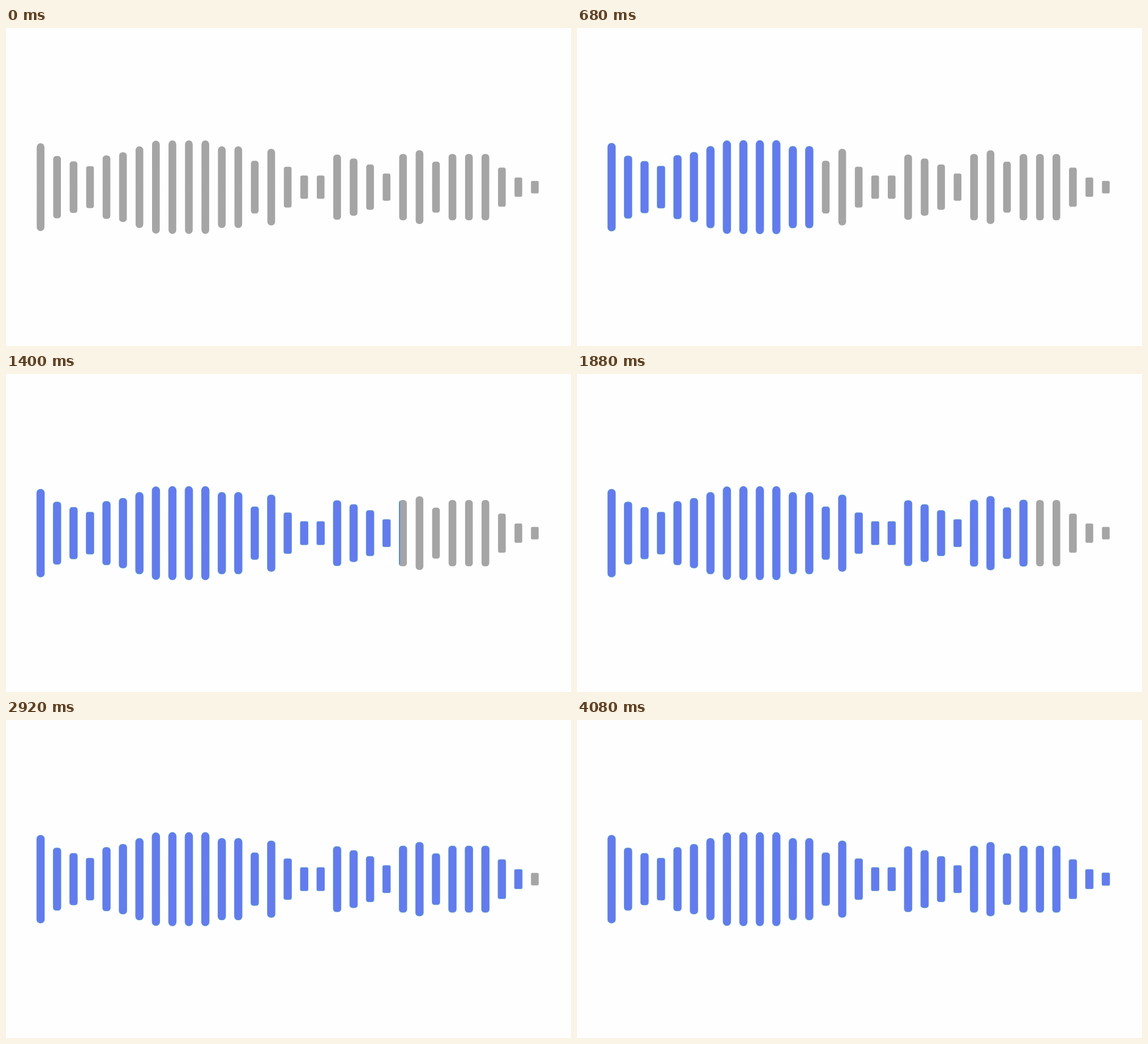
Recreate the animation shown at these times as an HTML page with a canvas. Size 998 px wide and 561 px high, loop 5 s.

```html
<!DOCTYPE html>
<html lang="en">
<head>
<meta charset="utf-8">
<title>Waveform progress</title>
<style>
html, body { margin: 0; width: 100%; height: 100%; overflow: hidden; background: #fefefe; }
canvas { display: block; }
</style>
</head>
<body>
<canvas id="stage" width="998" height="561"></canvas>
<script>
const ctx = document.getElementById('stage').getContext('2d');
const W = 998, H = 561, LOOP = 5000, STEP = 40;
const FIRST_X = 61.1, PITCH = 29.1, MIDDLE = 280.8, BAR_WIDTH = 13.6;
const SWEEP = 4000, SWEEP_FROM = 45, SWEEP_TO = 943;

// loudness of the clip, one bar height per sample
const levels = [155, 110, 91, 74, 112, 123, 144, 164, 165, 165, 165, 144, 144, 93, 135, 72,
  41, 41, 115, 101, 80, 48, 117, 130, 90, 117, 117, 117, 69, 34, 22];

const easeOutCubic = u => 1 - (1 - u) ** 3;

function edgeAt(t) {
  return SWEEP_FROM + (SWEEP_TO - SWEEP_FROM) * easeOutCubic(Math.min(1, t / SWEEP));
}

function barShapes(grow) {
  const shape = new Path2D();
  levels.forEach((level, i) => {
    const w = BAR_WIDTH + 2 * grow, h = level + 2 * grow;
    const radius = Math.min(w / 2, 1.5 + level * 0.035);
    shape.roundRect(FIRST_X + i * PITCH - w / 2, MIDDLE - h / 2, w, h, radius);
  });
  return shape;
}

const grey = barShapes(0), rim = barShapes(0.5), core = barShapes(-0.3);

function fill(shape, color) {
  ctx.fillStyle = color;
  ctx.fill(shape);
}

function clipped(x, width, paint) {
  ctx.save();
  ctx.beginPath();
  ctx.rect(x, 0, width, H);
  ctx.clip();
  paint();
  ctx.restore();
}

function draw() {
  const t = Math.floor(performance.now() % LOOP / STEP) * STEP;
  const edge = edgeAt(t);
  ctx.fillStyle = '#fefefe';
  ctx.fillRect(0, 0, W, H);
  clipped(edge, W - edge, () => fill(grey, '#a5a5a5'));
  clipped(0, edge, () => {
    fill(rim, '#5d9fc4');
    fill(core, '#637bee');
  });
  requestAnimationFrame(draw);
}
draw();
</script>
</body>
</html>
```
